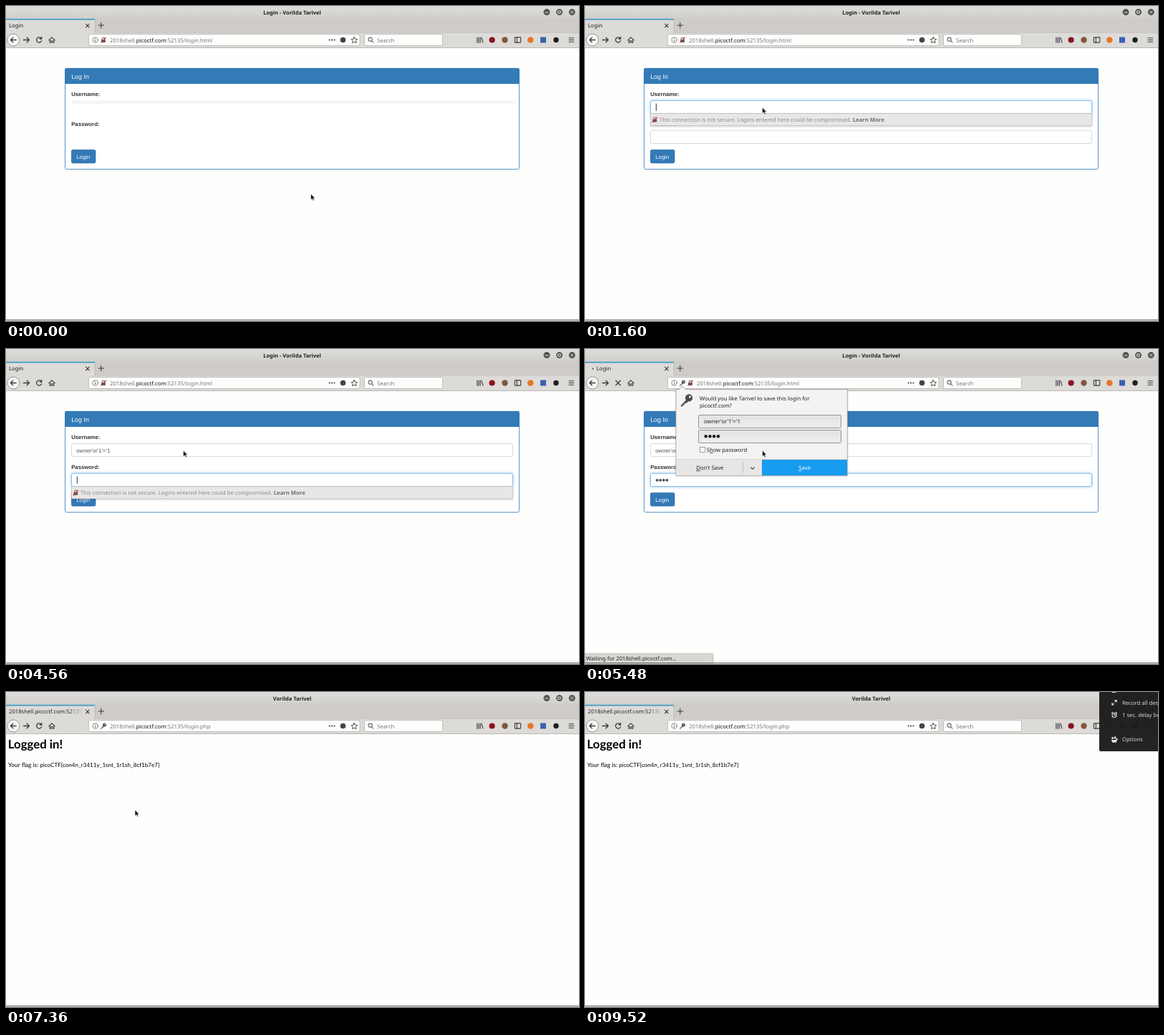
Recreate the animation shown at these times as an HTML page. Size 800 by 441 pixels, loop 9.68 s.

```html
<!DOCTYPE html>
<html lang="en">
<head>
<meta charset="utf-8">
<title>Login demo</title>
<style>
html, body { margin: 0; width: 100%; height: 100%; overflow: hidden; background: #fefefd; }
svg { display: block; width: 100vw; height: 100vh; }
text { font: 7.7px "Noto Sans", "Open Sans", sans-serif; fill: #222; white-space: pre; text-rendering: geometricPrecision; }
.bold { font-weight: 700; }
.mid { text-anchor: middle; }
.form text { font: 7.78px "Liberation Sans", Arial, sans-serif; fill: #333; }
.form .bold { font-weight: 700; }
.form .head { font-size: 8.9px; fill: #fff; }
.form .val { fill: #555; }
.page text { font: 8.45px Lato, sans-serif; fill: #000; }
.page .h1 { font-size: 16.8px; font-weight: 700; }
.page .flag { font-size: 8.1px; }
.page .sel { fill: #fff; }
.url { font-size: 7.75px; fill: #777; }
.host { fill: #111; font-weight: 500; }
.u { text-decoration: underline; }
.line { fill: none; stroke: #3b3b3b; stroke-width: 1.1; stroke-linecap: round; stroke-linejoin: round; }
.field { fill: #fff; stroke: #ccc; stroke-width: .8; }
.field.focus { stroke: #66afe9; filter: drop-shadow(0 0 2px #66afe9aa); }
.box { fill: url(#boxFill); stroke: #96938f; stroke-width: 1; }
.menu text { fill: #d6d6d6; }
.menu .line { stroke: #e0e0e0; }
</style>
</head>
<body>
<svg viewBox="0 0 800 441" preserveAspectRatio="none">
  <defs>
    <linearGradient id="bar" x2="0" y2="1"><stop stop-color="#dfddda"/><stop offset="1" stop-color="#d0cecb"/></linearGradient>
    <linearGradient id="boxFill" x2="0" y2="1"><stop stop-color="#e3e2e1"/><stop offset="1" stop-color="#efeeed"/></linearGradient>
    <linearGradient id="fade" gradientUnits="userSpaceOnUse" x1="88" x2="108" y1="0" y2="0"><stop stop-color="#222"/><stop offset="1" stop-color="#222" stop-opacity="0"/></linearGradient>
    <clipPath id="selClip"><rect id="selRect" x="47" y="97" width="0" height="10.3"/></clipPath>
    <g id="lock">
      <rect x="-2.9" y="-.6" width="5.8" height="4" rx=".6" fill="#5a5a5a"/>
      <path d="M-1.8 -.5V-1.6a1.8 1.8 0 0 1 3.6 0V-.5" fill="none" stroke="#5a5a5a"/>
      <path d="M-3.6 3.8L3.8 -3.6" stroke="#d7263d" stroke-width="1.2"/>
    </g>
    <g id="key">
      <circle cx="1.5" cy="-1.5" r="2.5"/>
      <path d="M.2 -.6L-4 3.6V4.3H-2.6V3.3H-1.5V2.2H-.4L1.4 .6Z"/>
      <circle cx="2.2" cy="-2.2" r=".75" fill="#f4f3f2"/>
    </g>
  </defs>

  <rect width="800" height="441" fill="#fefefd"/>

  <g id="form" class="form">
    <rect x="82.5" y="87.3" width="634" height="141.2" rx="2.2" fill="#fff" stroke="#337ab7" stroke-width=".8"/>
    <path d="M82.1 109V89.2a2.2 2.2 0 0 1 2.2 -2.2H714.7a2.2 2.2 0 0 1 2.2 2.2V109Z" fill="#337ab7"/>
    <text class="head" x="91.2" y="101.8">Log In</text>
    <text class="bold" x="91.2" y="126.2">Username:</text>
    <text class="bold" x="91.2" y="168">Password:</text>
    <g id="fields">
      <rect id="userBox" class="field" x="91.5" y="132.4" width="616" height="18.3" rx="2.2"/>
      <rect id="passBox" class="field" x="91.5" y="174.2" width="616" height="18.3" rx="2.2"/>
    </g>
    <path id="ghost" d="M92 134.5H711" stroke="#f5f3f3" stroke-width="4"/>
    <text id="user" class="val" x="98.3" y="144.7"></text>
    <g id="dots" fill="#555"></g>
    <rect id="caret" width=".8" height="10"/>
    <rect x="91.4" y="201.3" width="33.6" height="18.6" rx="2" fill="#337ab7" stroke="#2e6da4" stroke-width=".7"/>
    <text x="98.3" y="214" style="fill:#fff">Login</text>
  </g>

  <g id="warn">
    <rect x="91.5" y="150.6" width="616" height="16.8" fill="#e9e7e6" stroke="#c4c2c0" stroke-width=".7" style="filter:drop-shadow(0 1px 1.5px #0003)"/>
    <use href="#lock" x="97.3" y="159.2"/>
    <text x="104" y="162" style="fill:#8b8b8b">This connection is not secure. Logins entered here could be compromised. <tspan class="bold" fill="#707070">Learn More</tspan></text>
  </g>

  <g id="page" class="page">
    <text class="h1" x="2.8" y="79">Logged in!</text>
    <text x="3" y="104.7">Your flag is:</text>
    <text class="flag" x="47.2" y="104.7">picoCTF{con4n_r3411y_1snt_1r1sh_8cf1b7e7}</text>
    <g clip-path="url(#selClip)">
      <rect x="47" y="97" width="168" height="10.3" fill="#2b8fd0"/>
      <text class="flag sel" x="47.2" y="104.7">picoCTF{con4n_r3411y_1snt_1r1sh_8cf1b7e7}</text>
    </g>
  </g>

  <rect width="800" height="18" fill="url(#bar)"/>
  <rect y="18" width="800" height="19.5" fill="#cecbc8"/>
  <rect y="18" width="124" height="20" fill="#dddbd8"/>
  <rect y="37.3" x="124" width="676" height=".7" fill="#bdbab7"/>
  <rect y="38" width="800" height="20.5" fill="#dddbd8"/>
  <rect y="58" width="800" height=".9" fill="#b4b1ae"/>
  <rect y="17.8" width="124" height="1.7" fill="#3c9cc4"/>
  <rect x="123.7" y="18" width=".8" height="20" fill="#b5b2af"/>
  <text id="title" class="bold mid" x="399.5" y="11.5" style="font-size:7.5px"></text>
  <g fill="#555553">
    <circle cx="755" cy="8.6" r="4.5"/><circle cx="772.6" cy="8.6" r="4.5"/><circle cx="790.3" cy="8.6" r="4.5"/>
  </g>
  <path class="line" style="stroke:#e2e0dd;stroke-width:1" d="M753 9H757M771 7h3.2v3.2h-3.2ZM788.7 7l3.2 3.2M791.9 7l-3.2 3.2"/>

  <text id="tab" y="30.2"></text>
  <circle id="throb" cy="27.5" r="1.1" fill="#555"/>
  <path class="line" d="M111.6 25.2l4.6 4.6M116.2 25.2l-4.6 4.6M129 27h7.6M132.8 23.2v7.6"/>

  <circle cx="10.3" cy="47.5" r="8.5" fill="#f7f6f5" stroke="#8d8a86" stroke-width=".9"/>
  <path class="line" style="stroke-width:1.3" d="M14.2 47.5H6.6M9.7 44.2L6.4 47.5L9.7 50.8M24.4 47.5H32.2M29.2 44.2L32.5 47.5L29.2 50.8"/>
  <path id="reload" class="line" style="stroke-width:1.3" d="M49.2 45.3A3.6 3.6 0 1 0 49.7 48.6M49.8 43.4V46H47.2"/>
  <path id="stop" class="line" style="stroke-width:1.3" d="M43 44.3l6.4 6.4M49.4 44.3L43 50.7"/>
  <path class="line" d="M59.8 47.8L64 43.8L68.2 47.8M61.2 47.4V51.2H63V48.8H65V51.2H66.8V47.4"/>

  <g fill="#fdfdfc" stroke="#b3b0ad" stroke-width=".8">
    <rect x="115.4" y="39.6" width="378.6" height="16" rx="2"/>
    <rect x="500.5" y="39.6" width="109" height="16" rx="2"/>
  </g>
  <circle class="line" cx="124.6" cy="47.5" r="3.7" style="stroke:#666;stroke-width:.8"/>
  <path d="M124.6 46.9V49.8M124.6 45.1V46" stroke="#666"/>
  <use id="urlKey" href="#key" x="136" y="47.5" fill="#555"/>
  <use id="urlLock" href="#lock" y="47.5"/>
  <text id="url" class="url" y="50.5">2018shell.<tspan class="host">picoctf.com</tspan>:52135/<tspan id="file"></tspan></text>
  <g fill="#444"><circle cx="451.6" cy="47.5" r="1.1"/><circle cx="455" cy="47.5" r="1.1"/><circle cx="458.4" cy="47.5" r="1.1"/><circle cx="470.5" cy="47.5" r="3.8"/></g>
  <path class="line" style="stroke-width:.9" d="M486.3 43.4l1.3 2.8 3 .4-2.2 2.1.6 3-2.7-1.5-2.7 1.5.6-3-2.2-2.1 3-.4Z"/>
  <circle class="line" cx="508.6" cy="46.7" r="2.6" style="stroke:#666"/>
  <path class="line" style="stroke:#666" d="M510.6 48.8L513 51.2"/>
  <text x="518" y="50.5" style="fill:#737373">Search</text>

  <path class="line" d="M657.8 44V51.2M660 44V51.2M662.2 44V51.2M663.8 44.2L666 51"/>
  <circle cx="678.6" cy="47.5" r="4.1" fill="#8d1322"/>
  <circle cx="696.5" cy="47.5" r="4.2" fill="#80583c"/>
  <rect class="line" x="710.3" y="43.9" width="8.4" height="7.2" rx=".8"/><path class="line" d="M713.3 44V51"/>
  <circle cx="732.3" cy="47.5" r="4.3" fill="#e67627"/>
  <rect x="746" y="43.5" width="8" height="8" fill="#3a62b0"/>
  <circle cx="768" cy="47.5" r="3.7" fill="#1e1e1e"/>
  <path class="line" d="M786 44.7h6.6M786 47.5h6.6M786 50.3h6.6"/>

  <g id="status">
    <path d="M0 426.3H177a2 2 0 0 1 2 2V440H0Z" fill="#d9d7d4" stroke="#b4b1ae" stroke-width=".7"/>
    <text x="1.5" y="436">Waiting for 2018shell.picoctf.com...</text>
  </g>
  <rect y="439" width="800" height="1.2" fill="#6b6b6b"/>

  <g id="dialog">
    <path d="M127 56.7H131.5L136 52L140.5 56.7H366.3V177.5H127Z" fill="#f4f3f2" stroke="#a9a6a3" stroke-width=".8" style="filter:drop-shadow(0 .5px 1px #0003)"/>
    <use href="#key" transform="translate(142 71.5) scale(2.05)" fill="#4c4c4c"/>
    <text x="160" y="71.8">Would you like Tarivel to save this login for</text>
    <text x="160" y="82">picoctf.com?</text>
    <rect class="box" x="158.5" y="92.5" width="199" height="18" rx="1"/>
    <rect class="box" x="158.5" y="113.5" width="199" height="18" rx="1"/>
    <text x="166" y="103.9">owner'or'1'='1</text>
    <text id="plain" x="166" y="125">pass</text>
    <g id="bullets" fill="#222"></g>
    <rect x="160.5" y="137.5" width="7" height="7" fill="#fff" stroke="#8a8a8a" stroke-width=".8"/>
    <text x="169.8" y="144">S<tspan class="u">h</tspan>ow password</text>
    <g id="checked">
      <path class="line" style="stroke:#777;stroke-width:.8" d="M162.3 141.2l1.5 1.6 2.6 -3.6"/>
      <rect x="169.2" y="136" width="189" height="10.4" fill="none" stroke="#666" stroke-width=".7" stroke-dasharray="1 .6"/>
    </g>
    <rect x="127.4" y="155" width="119.6" height="22" fill="#e7e6e5"/>
    <path d="M127.4 154.5H366" stroke="#cfcdcb" stroke-width=".8"/>
    <path d="M220.7 158V173.6" stroke="#b4b2b0" stroke-width=".8"/>
    <path class="line" d="M231.6 165.8l2.4 2.4 2.4 -2.4"/>
    <rect x="247" y="155" width="119" height="22" fill="#189cf0"/>
    <text class="mid" x="174.3" y="169.2"><tspan class="u">D</tspan>on't Save</text>
    <text class="mid" x="306.6" y="169.2" style="fill:#fff"><tspan class="u">S</tspan>ave</text>
  </g>

  <g id="cursor">
    <path id="arrow" d="M0 0V8.6L2 6.8L3.4 9.8L4.9 9.1L3.5 6.2H6.1Z" fill="#111" stroke="#fff" stroke-width=".6"/>
    <path id="beam" class="line" style="stroke-width:.9" d="M-1.4 -4.2H1.4M0 -4.2V4.2M-1.4 4.2H1.4"/>
  </g>

  <g id="menu" class="menu">
    <path d="M718 -2V81a2 2 0 0 0 2 2H802V-2Z" fill="#1c1c1c" fill-opacity=".97"/>
    <text x="750" y=".3">No audio sound</text>
    <text x="750" y="17.7">Record all desktops</text>
    <text x="750" y="35">1 sec. delay before</text>
    <text x="750" y="69.4">Options</text>
    <path class="line" d="M736.4 .4H741M735.8 18L738 15.8M735.8 15.6V18H738.2M742.2 11.6L740 13.8M739.8 11.6H742.2V14M739 30.6V32.4H740.4M735.4 29.6l1.4 -1.2M742.6 29.6l-1.4 -1.2"/>
    <circle class="line" cx="739" cy="32.5" r="3"/>
    <g fill="#e0e0e0"><circle cx="736.6" cy="64.6" r="1.5"/><circle cx="740" cy="63.8" r="1.6"/><circle cx="742.4" cy="66" r="1.2"/><path d="M734.6 67h8.4l-1.4 3.8h-5.2Z"/></g>
  </g>
</svg>
<script>
const LOOP = 9680;
const $ = id => document.getElementById(id);
const show = (id, on) => { $(id).style.display = on ? "" : "none"; };
const clamp = (v, lo, hi) => Math.min(hi, Math.max(lo, v));
const within = (t, a, b) => t >= a && t < b;

const NAME = "owner'or'1'='1";
const nameKeys = [1720, 1840, 1960, 2080, 2240, 3000, 3120, 3280, 3440, 3600, 3840, 4040, 4200, 4360];
const passKeys = [4600, 4640, 4680, 4760];
const FOCUS = 1520, TAB = 4520, SUBMIT = 4920, ASK = 5080, LOADED = 5640;
const REVEAL = 5880, DISMISS = 7360, DRAG = 7640, DESELECT = 8240, MENU = 9080;

// time, x, y of the pointer
const path = [
  [360, 425.5, 263], [940, 247.5, 142],
  [5560, 247.5, 142], [5800, 165, 140],
  [5920, 165, 140], [6200, 190, 185],
  [7120, 190, 185], [7280, 180, 165],
  [7400, 180, 165], [7560, 46.5, 101.5],
  [7640, 46.5, 101.5], [8000, 222, 99.5],
  [8280, 222, 99.5], [8800, 676, 24],
  [9080, 676, 24], [9200, 740, -14]
];

function pointer(t) {
  const i = path.findIndex(p => p[0] > t);
  if (i === 0) return path[0].slice(1);
  if (i < 0) return path[path.length - 1].slice(1);
  const [t0, x0, y0] = path[i - 1], [t1, x1, y1] = path[i];
  const k = (t - t0) / (t1 - t0), e = k * k * (3 - 2 * k);
  return [x0 + (x1 - x0) * e, y0 + (y1 - y0) * e];
}

const row = (x, gap, y, r) => passKeys.map((_, i) => `<circle cx="${x + i * gap}" cy="${y}" r="${r}"/>`).join("");
$("dots").innerHTML = row(100.6, 4.6, 183.7, 1.9);
$("bullets").innerHTML = row(168.7, 5.75, 122.2, 2.3);

function drawForm(t) {
  $("fields").style.opacity = t < 80 ? 0 : t < 120 ? .5 : 1;
  show("ghost", t < 80);
  const typed = nameKeys.filter(k => k <= t).length;
  const dots = passKeys.filter(k => k <= t).length;
  const user = $("user");
  user.textContent = NAME.slice(0, typed);
  [...$("dots").children].forEach((d, i) => { d.style.display = i < dots ? "" : "none"; });

  const inPass = t >= TAB;
  $("userBox").classList.toggle("focus", within(t, FOCUS, TAB));
  $("passBox").classList.toggle("focus", inPass);
  const last = Math.max(...[FOCUS, TAB, ...nameKeys, ...passKeys].filter(k => k <= t));
  show("caret", within(t, FOCUS, SUBMIT) && (t - last) % 1200 < 600);
  const x = inPass ? 98.5 + dots * 4.6 : 98.5 + (typed ? user.getComputedTextLength() : 0);
  $("caret").setAttribute("x", x + .4);
  $("caret").setAttribute("y", inPass ? 178.4 : 136.6);
}

function drawBrowser(t) {
  const loading = within(t, SUBMIT, LOADED), done = t >= LOADED, key = t >= ASK;
  $("title").textContent = (done ? "" : "Login - ") + "Vorilda Tarivel";
  $("tab").textContent = done ? "2018shell.picoctf.com:52135" : "Login";
  $("tab").style.fill = done ? "url(#fade)" : "#222";
  $("tab").setAttribute("x", loading ? 16 : 4);
  $("throb").setAttribute("cx", 7.5 + 3.5 * Math.cos((t - 5480) * Math.PI / 450));
  show("throb", loading);
  show("stop", loading);
  show("reload", !loading);
  show("status", loading);
  show("urlKey", key);
  show("urlLock", !done);
  $("urlLock").setAttribute("x", key ? 147 : 136);
  $("url").setAttribute("x", key && !done ? 156 : 145);
  $("file").textContent = done ? "login.php" : "login.html";
}

function render(t) {
  const done = t >= LOADED;
  show("form", !done);
  show("page", done);
  if (!done) drawForm(t);
  drawBrowser(t);

  show("warn", within(t, FOCUS + 40, SUBMIT));
  $("warn").setAttribute("transform", `translate(0 ${t < TAB ? 0 : 42})`);

  const seen = t >= REVEAL;
  show("dialog", within(t, ASK, DISMISS));
  show("checked", seen);
  show("plain", seen);
  show("bullets", !seen);

  const [x, y] = pointer(t);
  const beam = within(t, 880, FOCUS + 40) || within(t, 7530, 7980);
  $("cursor").setAttribute("transform", `translate(${x} ${y})`);
  show("beam", beam);
  show("arrow", !beam);
  $("selRect").setAttribute("width", within(t, DRAG, DESELECT) ? clamp(x - 47, 0, 167.5) : 0);

  show("menu", t >= MENU);
  $("menu").style.opacity = clamp((t - MENU + 60) / 200, 0, 1);
}

const start = performance.now();
function tick() {
  render((performance.now() - start) % LOOP);
  requestAnimationFrame(tick);
}
tick();
</script>
</body>
</html>
```
